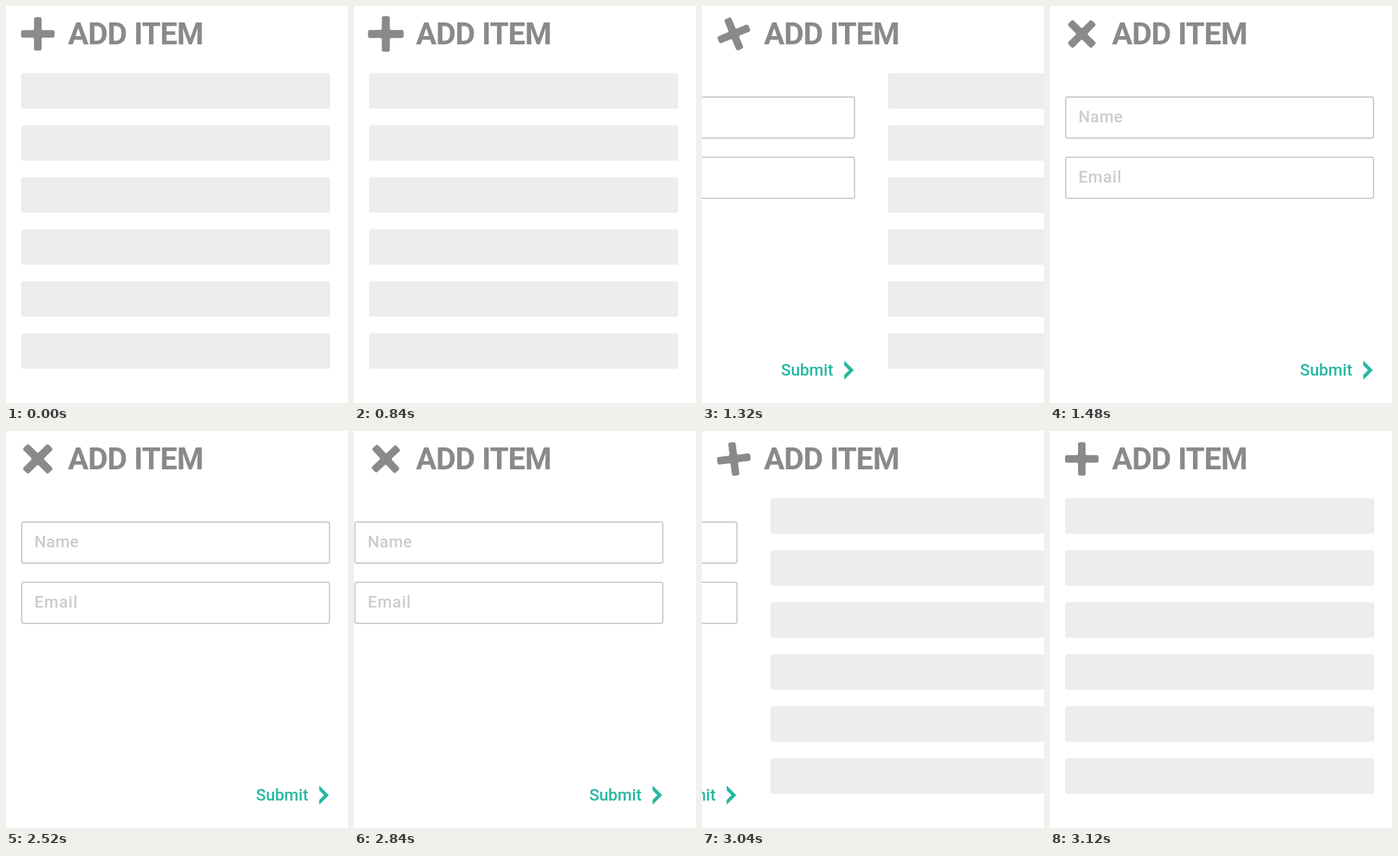
Write an HTML page that moves like this. It is 500x580 px and loops after 4000 ms.

```html
<!DOCTYPE html>
<html lang="en">
<head>
<meta charset="utf-8">
<title>Add item</title>
<style>
  html, body { margin: 0; width: 100%; height: 100%; overflow: hidden; background: #fff; }
  svg { display: block; }
  text { font-family: Roboto, "Open Sans", sans-serif; font-weight: 500; font-size: 24px; }
  .title { font-weight: 700; font-size: 45px; letter-spacing: -1px; fill: #8a8a8a; }
  .hint { fill: #ccc; }
  .field { fill: #fff; stroke: #ccc; stroke-width: 2; }
  .accent { fill: #26b8a2; }
</style>
</head>
<body>
<svg width="500" height="580" viewBox="0 0 500 580">
  <g id="list"></g>
  <g id="form">
    <rect class="field" x="23" y="133" width="450" height="60" rx="3"/>
    <rect class="field" x="23" y="221" width="450" height="60" rx="3"/>
    <text class="hint" x="41.5" y="170" letter-spacing=".3">Name</text>
    <text class="hint" x="41.5" y="258" letter-spacing=".8">Email</text>
    <text class="accent" x="365.5" y="540">Submit</text>
    <path class="accent" d="M458 518L472 532L458 546V539L465 532L458 525Z"/>
  </g>
  <path id="plus" fill="#8a8a8a" d="M-5.5-21.5q0-3 3-3h5q3 0 3 3v14q0 2 2 2h14q3 0 3 3v5q0 3-3 3h-14q-2 0-2 2v14q0 3-3 3h-5q-3 0-3-3v-14q0-2-2-2h-14q-3 0-3-3v-5q0-3 3-3h14q2 0 2-2z"/>
  <text class="title" x="90.5" y="56">ADD</text>
  <text class="title" x="187" y="56">ITEM</text>
</svg>
<script>
const LOOP = 4000, STEP = 40, WIDTH = 500;
const $ = id => document.getElementById(id);
const list = $('list'), form = $('form'), plus = $('plus');

function addRect(y, h, fill) {
  const r = document.createElementNS('http://www.w3.org/2000/svg', 'rect');
  const attrs = { x: 22, y, width: 452, height: h, rx: 4, fill };
  for (const k in attrs) r.setAttribute(k, attrs[k]);
  list.append(r);
}
for (let i = 0; i < 6; i++) {
  const y = 98 + i * 76;
  addRect(y, 52, '#f8ece4'); // warm top edge
  addRect(y + 1, 51, '#ededed');
}

// Eased progress of t from start over a duration
function ease(t, start, dur) {
  const p = Math.min(1, Math.max(0, (t - start) / dur));
  return p * p * (3 - 2 * p);
}
const pulse = (t, start) => 0.2 * (1 - Math.abs(1 - 2 * ease(t, start, 160)));

function draw(t) {
  const open = ease(t, 1160, 320) - ease(t, 2800, 320);
  const scale = 1 + pulse(t, 800) + pulse(t, 2480);
  list.setAttribute('transform', `translate(${WIDTH * open} 0)`);
  form.setAttribute('transform', `translate(${WIDTH * (open - 1)} 0)`);
  plus.setAttribute('transform', `translate(46.5 40.8) rotate(${-45 * open}) scale(${scale})`);
}

const t0 = performance.now();
function tick() {
  const t = (performance.now() - t0) % LOOP;
  draw(Math.floor(t / STEP) * STEP);
  requestAnimationFrame(tick);
}
draw(0);
requestAnimationFrame(tick);
</script>
</body>
</html>
```
